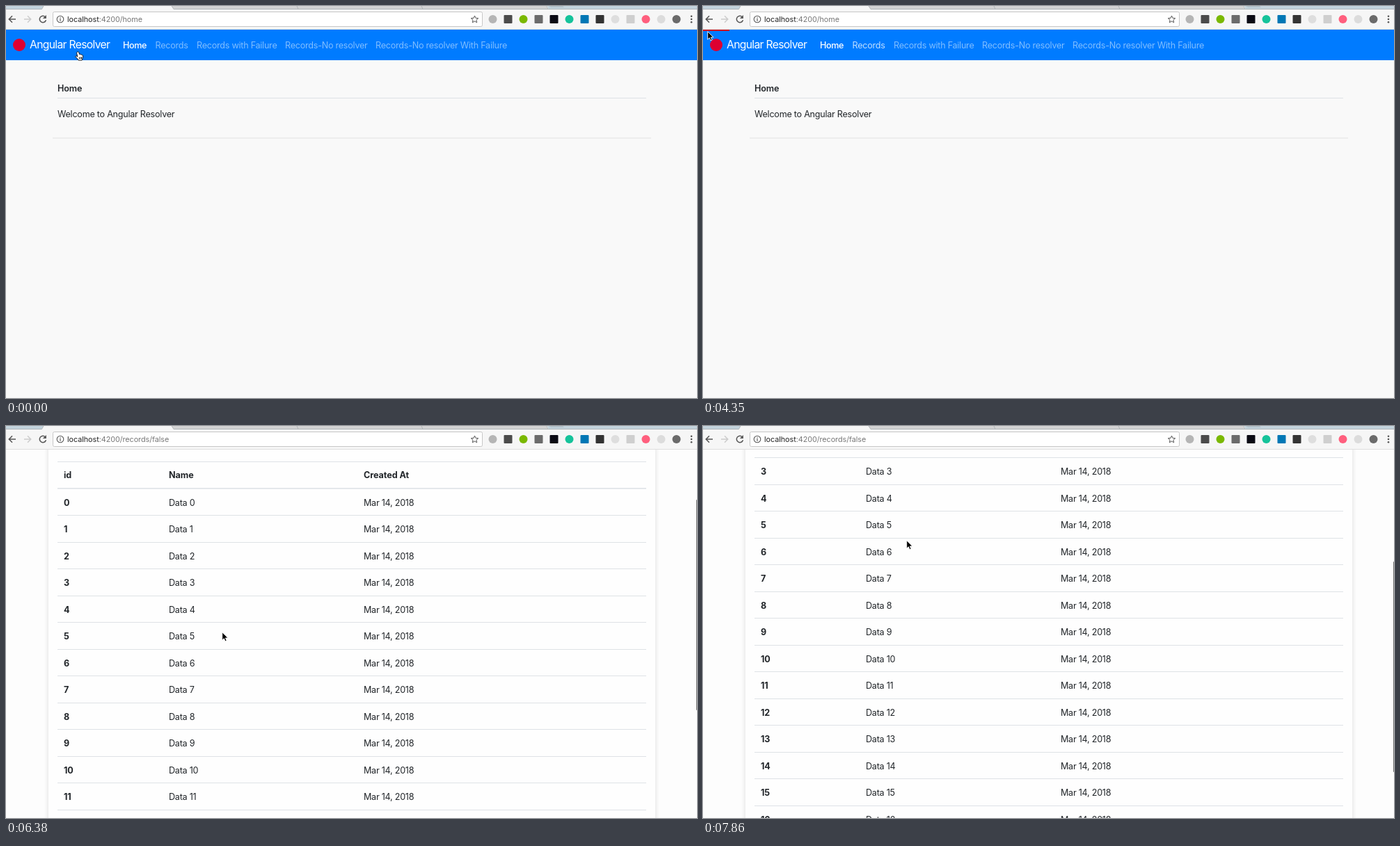
An HTML page for the animation above (8000 ms loop, 993 by 564 pixels).

```html
<!DOCTYPE html>
<html lang="en">
<head>
<meta charset="utf-8">
<title>Angular Resolver</title>
<style>
  html, body { margin: 0; width: 100%; height: 100%; overflow: hidden; background: #f9f9f9; }
  svg { display: block; width: 993px; height: 564px; }
  text { font: 12.6px Inter, "Liberation Sans", sans-serif; letter-spacing: -.02em; fill: #212529; white-space: pre; }
  .bold { font-weight: 700; letter-spacing: -.005em; }
  .head { font-weight: 600; letter-spacing: -.012em; }
  .brand { font-size: 15.7px; letter-spacing: -.043em; fill: #fff; }
  .link { fill: #fff; fill-opacity: .5; }
  .on { font-weight: 500; letter-spacing: -.03em; fill-opacity: 1; }
  .url { font-size: 10.8px; letter-spacing: -.005em; fill: #222; }
  .url tspan { fill: #777; }
  .rule { fill: #dee2e6; }

  .anim, .home, .records { animation: 8s step-end infinite; }
  .home { animation-name: before; }
  .records { animation-name: after; }
  .hover { animation-name: hover; }
  .bar { animation-name: bar; }
  .page { animation-name: scroll; }
  .card, .thumb { animation-name: scrolled; }
  .thumb rect { animation-name: thumb; }
  .pointer { animation-name: move; }
  .hand { animation-name: hand; }
  .arrow { animation-name: arrow; }

  @keyframes before { 0% { opacity: 1 } 58%, 100% { opacity: 0 } }
  @keyframes after { 0% { opacity: 0 } 58%, 100% { opacity: 1 } }
  @keyframes hover { 0% { fill-opacity: .5 } 4.375%, 100% { fill-opacity: .75 } }
  @keyframes hand { 0% { opacity: 1 } 35.875%, 100% { opacity: 0 } }
  @keyframes arrow { 0% { opacity: 0 } 35.875%, 100% { opacity: 1 } }
  @keyframes scrolled { 0% { opacity: 0 } 75.375%, 100% { opacity: 1 } }
  @keyframes bar {
    0% { width: 0; opacity: 1 }
    35.875% { width: 9px }
    41.375% { width: 18px }
    47% { width: 28px }
    54.375% { width: 38px }
    58% { width: 120px }
    59.875% { width: 560px }
    62.5% { width: 945px; opacity: .8 }
    64.25% { width: 977px; opacity: .5 }
    66.125%, 100% { width: 977px; opacity: 0 }
  }
  @keyframes scroll {
    0% { transform: none }
    75.375% { transform: translateY(-56px) }
    77.125% { transform: translateY(-118px) }
    79.625% { transform: translateY(-126px) }
    82.25% { transform: translateY(-34px) }
    84.875% { transform: translateY(11px) }
    87.5% { transform: none }
    90.125% { transform: translateY(-20px) }
    92.75% { transform: translateY(-110px) }
    94.625% { transform: translateY(-190px) }
    96.5% { transform: translateY(-250px) }
    98.25%, 100% { transform: translateY(-286px) }
  }
  @keyframes thumb {
    0% { y: 36px; height: 303px }
    75.375% { y: 67px }
    77.125% { y: 102px }
    79.625% { y: 106px }
    82.25% { y: 55px; height: 303px }
    84.875% { y: 37px; height: 295px }
    87.5% { y: 36px; height: 303px }
    90.125% { y: 47px }
    92.75% { y: 97px }
    94.625% { y: 142px }
    96.5% { y: 175px }
    98.25%, 100% { y: 195px; height: 303px }
  }
  @keyframes move {
    0% { transform: translate(99px, 65px) }
    1.875% { transform: translate(160px, 66px) }
    4.375% { transform: translate(208px, 64px) }
    8.125% { transform: translate(212px, 64px) }
    13.625% { transform: translate(216px, 63px) }
    15.5% { transform: translate(222px, 63px) }
    17.375% { transform: translate(227px, 63px) }
    32.25% { transform: translate(206px, 62px) }
    34.125% { transform: translate(150px, 57px) }
    35.875% { transform: translate(88px, 50px) }
    37.75% { transform: translate(40px, 43px) }
    39.625% { transform: translate(14px, 38px) }
    41.375% { transform: translate(6px, 36px) }
    56.125% { transform: translate(9px, 36px) }
    58% { transform: translate(14px, 37px) }
    59.875% { transform: translate(20px, 37px) }
    62.5% { transform: translate(24px, 38px) }
    64.25% { transform: translate(40px, 55px) }
    66.125% { transform: translate(110px, 120px) }
    68% { transform: translate(210px, 215px) }
    69.75% { transform: translate(310px, 300px) }
    71.625% { transform: translate(354px, 332px) }
    79.625% { transform: translate(310px, 296px) }
    82.25% { transform: translate(228px, 226px) }
    84.875% { transform: translate(189px, 192px) }
    90.125% { transform: translate(230px, 183px) }
    92.75% { transform: translate(270px, 172px) }
    94.625%, 100% { transform: translate(292px, 164px) }
  }
</style>
</head>
<body>
<svg viewBox="0 0 993 564">
  <defs>
    <clipPath id="view"><rect y="34" width="993" height="530"/></clipPath>
    <filter id="soft" x="-5%" width="110%" y="-5%" height="110%"><feGaussianBlur stdDeviation="2.5"/></filter>
  </defs>

  <g clip-path="url(#view)">
    <rect width="993" height="564" fill="#f9f9f9"/>
    <g class="records">
      <rect x="17" y="34" width="921" height="530" fill="#fefefe"/>
    </g>
    <rect class="anim card" width="993" height="564" fill="#fdfdfd"/>

    <g class="anim page">
      <g class="anim card">
        <rect x="59" y="97" width="876" height="960" rx="4" fill="#e9e9e9" filter="url(#soft)"/>
        <rect x="61" y="97" width="872" height="960" rx="4" fill="#fefefe"/>
      </g>
      <rect y="34" width="993" height="44" fill="#007bff"/>
      <circle cx="19" cy="56" r="9" fill="#dd0031"/>
      <text class="brand" x="34" y="61.3">Angular Resolver</text>
      <text class="link" x="274" y="60.5">Records with Failure</text>
      <text class="link" x="401" y="60.5">Records-No resolver</text>
      <text class="link" x="531" y="60.5">Records-No resolver With Failure</text>
      <rect class="rule" x="74" y="132" width="846" height="1"/>

      <g class="home">
        <text class="link on" x="168" y="60.5">Home</text>
        <text class="link anim hover" x="214.5" y="60.5">Records</text>
        <text class="head" x="74" y="122.5">Home</text>
        <text x="74" y="159.5">Welcome to Angular Resolver</text>
        <rect x="67" y="189.5" width="860" height="1" fill="#e1e1e1"/>
      </g>

      <g class="records" id="records">
        <text class="link" x="168" y="60.5">Home</text>
        <text class="link on" x="214.5" y="60.5">Records</text>
        <text class="head" x="74" y="122.5">Records Using Resolver</text>
        <text x="74" y="159.5">Fetched Data from Resolver</text>
        <rect class="rule" x="74" y="177" width="846" height="1"/>
        <rect class="rule" x="74" y="215" width="846" height="1.6"/>
        <text class="bold" x="83" y="201">id</text>
        <text class="bold" x="234" y="201">Name</text>
        <text class="bold" x="514" y="201">Created At</text>
      </g>
    </g>

    <rect class="anim bar" y="34" height="2" fill="#d0121f"/>
    <g class="anim thumb"><rect class="anim" x="992" width="4" rx="1" fill="#6f6f6f"/></g>
  </g>

  <g id="chrome">
    <rect width="993" height="34" fill="#f6f6f6"/>
    <path d="M0 0H54L51 5H0ZM778 0H993V5H780Z" fill="#c3d3dc"/>
    <path d="M238 0H777L779 5H241Z" fill="#d3d3d3"/>
    <path d="M54 0L51.500 4.500H0M238 0L241 4.500H993M418 0L420 4.500M597 0L599 4.500M777 0L779 4.500" fill="none" stroke="#a9afb2" stroke-width=".8"/>
    <path d="M780 0H800L802 2H783Z" fill="#b3c1c9"/>
    <rect y="33" width="993" height="1" fill="#dedede"/>
    <rect x="67.500" y="8.500" width="617" height="21" rx="2" fill="#fff" stroke="#c6c6c6"/>
    <g fill="none" stroke-width="1.5">
      <path d="M14 19H4.500M9 14.300L4.300 19L9 23.700" stroke="#555"/>
      <path d="M26 19H35.500M31 14.300L35.700 19L31 23.700" stroke="#ccc"/>
      <path d="M56.400 15.700A4.700 4.700 0 1 0 57.500 20.300" stroke="#555"/>
      <circle cx="78" cy="19" r="4.800" stroke="#555" stroke-width="1.100"/>
      <path d="M78 18.300V21.700M78 16.200V17.400" stroke="#555" stroke-width="1.200"/>
      <path d="M673.500 14L675 17.400L678.700 17.700L675.900 20.200L676.700 23.800L673.500 21.900L670.300 23.800L671.100 20.200L668.300 17.700L672 17.400Z" stroke="#555" stroke-width="1"/>
    </g>
    <path d="M57.900 13V18H52.900Z" fill="#555"/>
    <g fill="#555"><circle cx="985" cy="14.700" r="1.300"/><circle cx="985" cy="19" r="1.300"/><circle cx="985" cy="23.300" r="1.300"/></g>
    <text class="url home" x="88" y="23">localhost<tspan>:4200/home</tspan></text>
    <text class="url records" x="88" y="23">localhost<tspan>:4200/records/false</tspan></text>
  </g>

  <g class="anim pointer">
    <path class="anim hand" d="M3.500 1.200C4.500 .3 5.500 .9 5.800 2L6.600 4.600C7.300 4 8.300 4.200 8.600 5C9.300 4.600 10.100 4.900 10.300 5.700C11.200 5.500 11.700 6.100 11.600 7.200L11 10.300L10.200 13H5L3.800 11L1 8.200C.4 7.400 1.300 6.500 2.300 7L3.800 8.100L2.700 3.200C2.500 2.300 2.700 1.500 3.500 1.200ZM6.300 8.700V11M8 8.600V11M9.500 8.500V11" fill="#fff" stroke="#000" stroke-width=".9"/>
    <path class="anim arrow" d="M.7 .8V12.200L3.300 9.700L5 13.700L7.100 12.800L5.400 9H9Z" fill="#000" stroke="#fff" stroke-width=".9"/>
  </g>
</svg>
<script>
  const add = (parent, tag, attrs, text = '') => {
    const el = document.createElementNS('http://www.w3.org/2000/svg', tag);
    for (const key in attrs) el.setAttribute(key, attrs[key]);
    el.textContent = text;
    parent.append(el);
  };

  const table = document.getElementById('records');
  for (let i = 0; i < 20; i++) {
    const y = 240.5 + i * 38.5;
    add(table, 'text', { class: 'bold', x: 83, y }, i);
    add(table, 'text', { x: 234, y }, `Data ${i}`);
    add(table, 'text', { x: 514, y }, 'Mar 14, 2018');
    add(table, 'rect', { class: 'rule', x: 74, y: Math.round(y + 13.5), width: 846, height: 1 });
  }

  // toolbar buttons: colour and shape (c = circle, s = square)
  const icons = ['#b5b5b5 c', '#4b4b4b s', '#7ab800 c', '#6b6b6b s', '#0b0b14 s', '#15c39a c',
    '#0077b5 s', '#333 s', '#dedede c', '#cfcfcf s', '#ff5f7e c', '#dcdcdc c', '#6a6a6a c'];
  const bar = document.getElementById('chrome');
  icons.forEach((icon, i) => {
    const [fill, shape] = icon.split(' ');
    const cx = 699.5 + i * 22;
    if (shape === 'c') add(bar, 'circle', { cx, cy: 19, r: 6, fill });
    else add(bar, 'rect', { x: cx - 6, y: 13, width: 12, height: 12, rx: 1, fill });
  });
</script>
</body>
</html>
```
